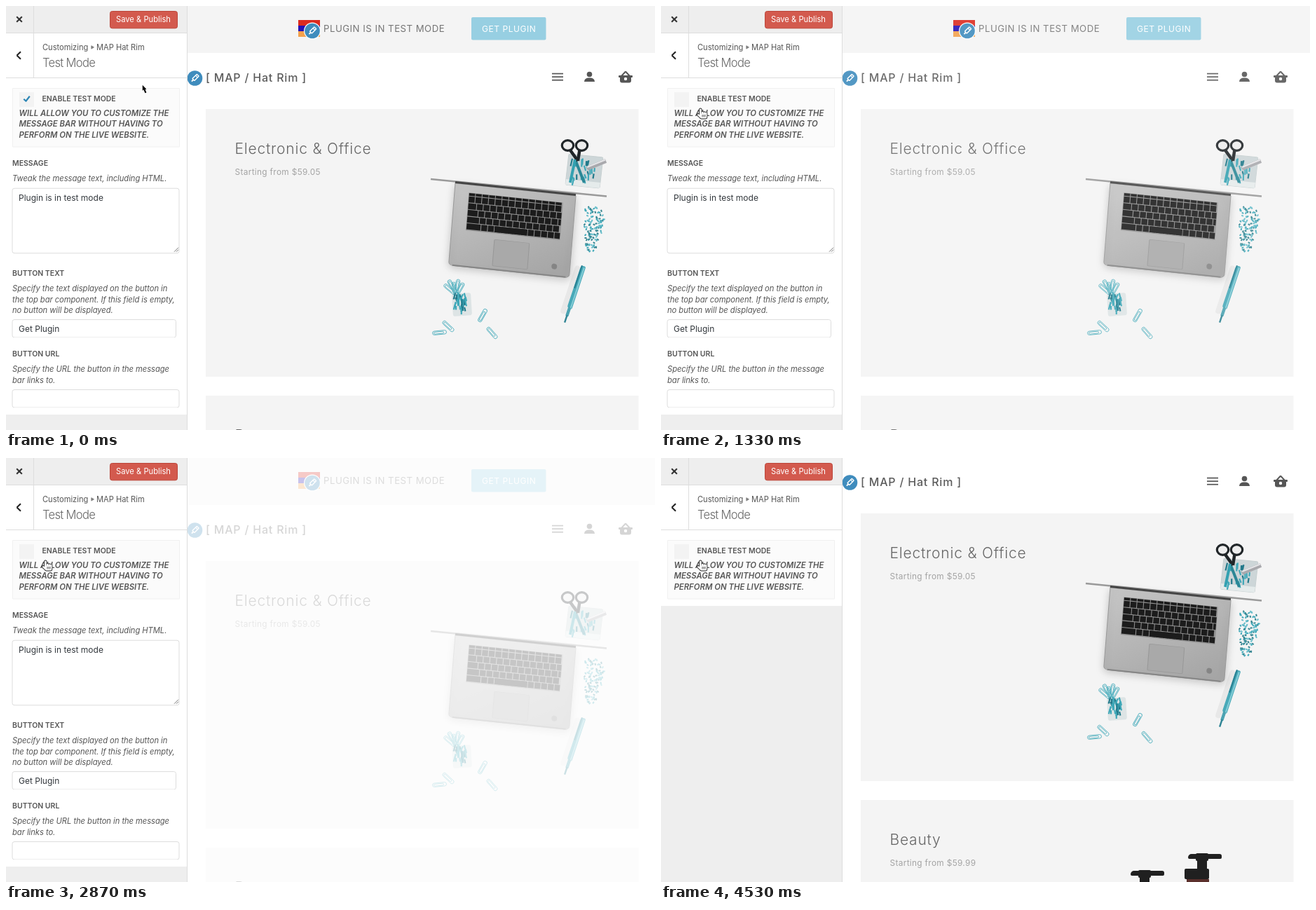
An HTML page with a canvas that plays this animation: 926 px wide and 605 px high, repeating every 4.59 s.

```html
<!DOCTYPE html>
<html lang="en">
<head>
<meta charset="utf-8">
<title>Test mode toggle</title>
<style>
html, body { margin: 0; width: 100%; height: 100%; overflow: hidden; background: #fff; }
canvas { display: block; }
</style>
</head>
<body>
<canvas id="stage" width="926" height="605"></canvas>
<script>
const ctx = document.getElementById('stage').getContext('2d');
const LOOP = 4590;
const SWAP = 3150;
const SIDEBAR = 258;
const BAR_HEIGHT = 68;

const phase = (t, from, to) => Math.max(0, Math.min(1, (t - from) / (to - from)));
const swing = p => 0.5 - Math.cos(p * Math.PI) / 2;
const mix = (a, b, p) => a + (b - a) * p;
const times = (n, draw) => { for (let i = 0; i < n; i++) draw(i); };

function randomizer(seed) {
  const next = () => (seed = (seed * 16807) % 2147483647) / 2147483647;
  return (from, to) => mix(from, to, next());
}

/* Drawing helpers */

const style = (font, color, spacing = 0) =>
  ({ font: font + ' Inter, sans-serif', color, spacing: spacing + 'px' });

const styles = {
  label: style('600 10.5px', '#555'),
  strong: style('italic 600 11.35px', '#555'),
  hint: style('italic 400 11.2px', '#555', -0.04),
  field: style('400 12px', '#32373c'),
  crumb: style('400 11.1px', '#555'),
  title: style('300 16.6px', '#666', -0.7),
  save: style('400 11.2px', '#fff'),
  bar: style('400 13.2px', '#757575', 0.5),
  cta: style('400 12px', '#fff', 0.55),
  site: style('500 16px', '#5c5c5c', 0.8),
  heading: style('300 21px', '#666', 0.8),
  price: style('400 11.8px', '#a3a3a3', 0.35)
};

function text(str, x, y, { font, color, spacing }) {
  ctx.font = font;
  ctx.letterSpacing = spacing;
  ctx.fillStyle = color;
  ctx.fillText(str, x, y);
}

function paint(fill, stroke, width = 1) {
  if (fill) { ctx.fillStyle = fill; ctx.fill(); }
  if (stroke) { ctx.strokeStyle = stroke; ctx.lineWidth = width; ctx.stroke(); }
}

function rect(x, y, w, h, color) {
  ctx.fillStyle = color;
  ctx.fillRect(x, y, w, h);
}

function box(x, y, w, h, r, ...colors) {
  ctx.beginPath();
  ctx.roundRect(x, y, w, h, r);
  paint(...colors);
}

function oval(x, y, rx, ry, ...colors) {
  ctx.beginPath();
  ctx.ellipse(x, y, rx, ry, 0, 0, 7);
  paint(...colors);
}

function line(x1, y1, x2, y2, color, width = 1) {
  ctx.beginPath();
  ctx.moveTo(x1, y1);
  ctx.lineTo(x2, y2);
  paint(null, color, width);
}

function scoped(draw) {
  ctx.save();
  draw();
  ctx.restore();
}

function placed(x, y, angle, draw) {
  scoped(() => {
    ctx.translate(x, y);
    ctx.rotate(angle);
    draw();
  });
}

// Maps a 100 by 100 square onto the parallelogram spanned by two edges.
function skewed(x, y, [ux, uy], [vx, vy], draw) {
  scoped(() => {
    ctx.transform(ux / 100, uy / 100, vx / 100, vy / 100, x, y);
    draw();
  });
}

function clipped(x, y, w, h, draw) {
  scoped(() => {
    ctx.beginPath();
    ctx.rect(x, y, w, Math.max(0, h));
    ctx.clip();
    draw();
  });
}

/* Preview pane */

function badge(x, y) {
  oval(x, y, 12, 12, '#fff');
  oval(x, y, 10.8, 10.8, '#3f8cbd');
  placed(x, y, Math.PI / 4, () => {
    box(-2, -6, 4, 9, 0.5, null, '#fff', 1.4);
    line(-2, -3.4, 2, -3.4, '#fff', 1.2);
    line(0, 3, 0, 6.5, '#fff', 2);
  });
}

function laptop() {
  skewed(641, 253, [172, 18], [-9.5, 117], () => {
    scoped(() => {
      ctx.shadowColor = 'rgba(0,0,0,.2)';
      ctx.shadowBlur = 12;
      ctx.shadowOffsetY = 3;
      const metal = ctx.createLinearGradient(0, 0, 80, 100);
      metal.addColorStop(0, '#c6c6c6');
      metal.addColorStop(1, '#a6a6a6');
      box(0, 0, 100, 100, [0, 0, 4, 4], metal, '#999', 0.6);
    });
    line(3, 99.3, 97, 99.3, '#858585', 1.6);
    keyboard(12.2, 10, 77.3, 45);
    box(36, 63, 29, 32, 1, '#a9a9a9', '#989898', 0.6);
    oval(87, 88, 2.3, 3.4, '#858585');
  });
  line(606, 247, 857, 271.5, '#9a9a9a', 2.6);
  line(641, 251.5, 813, 269.5, '#454545', 3.2);
}

function keyboard(x, y, w, h) {
  const pitch = w / 14;
  const rowHeight = h / 5.5;
  rect(x - 0.4, y - 0.4, w + 0.8, h + 0.8, '#929292');
  times(6, row => {
    const top = row ? y + (row - 0.5) * rowHeight : y;
    const height = rowHeight * (row ? 1 : 0.5) - 0.9;
    const shift = row > 1 ? (row - 1) * pitch * 0.3 : 0;
    rect(x, top, pitch + shift - 0.6, height, '#1c1c1c');
    for (let k = x + pitch + shift; k < x + w - 1; k += pitch) {
      rect(k, top, Math.min(pitch - 0.6, x + w - k), height, '#1c1c1c');
    }
    if (row === 5) rect(x + w * 0.3, top, w * 0.35, height, '#1c1c1c');
  });
}

function shards(seed, count, x, y, w, h) {
  const random = randomizer(seed);
  times(count, i => {
    const sx = x + random(0, w);
    const sy = y + random(0, h);
    line(sx, sy, sx + random(-3, 3), sy + random(5, 11), i % 3 ? '#3fa8b8' : '#237a8b', 2.2);
  });
}

function scissorsCup() {
  skewed(803, 211, [49, 5], [-5, 44], () => {
    box(0, 0, 100, 100, 4, 'rgba(190,203,206,.7)', '#c6cfd0', 2);
    rect(0, 82, 100, 18, 'rgba(235,240,240,.8)');
  });
  shards(61, 20, 808, 217, 34, 30);
  line(829, 232, 856, 221, '#a9a9ad', 6);
  line(829, 230, 855, 219.5, '#e5e5e8', 2);
  for (const [x, side] of [[801.5, 1], [821.5, -1]]) {
    line(812, 219, 815 + side * 10, 252, side > 0 ? '#2b8796' : '#34a1b1', 4);
    line(x + side * 3, 205, 816, 221, '#202528', 4.5);
    oval(x, 199, 8.2, 7.3, '#ededed', '#202528', 3.2);
  }
}

function pins() {
  const random = randomizer(907);
  times(115, i => {
    const p = random(0, 1) ** 1.2;
    const spread = mix(15, 6, p * p);
    const x = mix(840, 835, p) + random(-spread, spread);
    const y = mix(288, 349, p);
    const angle = random(0, 6);
    line(x, y, x + Math.cos(angle) * 3, y + Math.sin(angle) * 3,
      `hsl(188 48% ${38 + i % 3 * 11}%)`, 2);
  });
}

function pen() {
  placed(824, 371, Math.atan2(81, -27), () => {
    box(2, 3, 72, 8, 4, 'rgba(0,0,0,.05)');
    box(0, -3.6, 64, 7.2, [2, 2, 4, 4], '#48a9b8');
    rect(2, -2.6, 62, 2, '#86cdd7');
    rect(0, 1.2, 34, 2, '#277f91');
    box(62, -2.2, 14, 4.4, 2, '#4ca3b2');
    line(74, 0, 85, 0, '#2f8494', 2.4);
  });
}

function clip(x, y, angle) {
  placed(x, y, angle, () => {
    box(-10, -2.7, 20, 5.4, 2.7, null, '#59b3c1', 0.9);
    box(-8, -1.3, 14, 2.8, 1.4, null, '#59b3c1', 0.9);
  });
}

function clipCup() {
  skewed(636, 411, [27, -2], [2, 32], () => box(0, 0, 100, 100, 10, 'rgba(215,224,225,.8)'));
  times(5, i => clip(633 + i * 3.6, 404 - i % 2 * 4, 0.7 + i * 0.35));
  shards(33, 32, 641, 408, 15, 23);
}

function pump(x, y) {
  const dark = '#202020';
  box(x, y, 48, 7, [5, 3, 2, 2], dark);
  box(x + 11, y - 1, 18, 11, 2, dark);
  rect(x + 13, y + 8, 14, 15, dark);
}

function icons() {
  const gray = '#565656';
  times(3, i => rect(779, 95.7 + i * 4.6, 16, 1.7, gray));
  oval(832.5, 97.5, 3.8, 3.8, gray);
  box(825, 102.5, 15, 5.6, [7, 7, 0, 0], gray);
  for (const side of [-1, 1]) line(884, 93.5, 884 + side * 6, 100, gray, 1.9);
  box(874, 99, 20, 3, 1, gray);
  box(876, 100, 16, 9.5, [0, 0, 3, 3], gray);
  oval(884, 104, 2.2, 2.2, '#fff');
}

function card(y, heading, price) {
  rect(285, y, 617.5, 382, '#f4f4f4');
  text(heading, 326.5, y + 63.5, styles.heading);
  text(price, 326.5, y + 94, styles.price);
}

function preview() {
  rect(SIDEBAR + 1, 0, 667, 67, '#f4f4f4');
  ['#db2b1f', '#2411b5', '#f3a14d'].forEach((c, i) => rect(417, 20 + i * 8, 31, 8, c));
  badge(437, 35.5);
  text('PLUGIN IS IN TEST MODE', 453, 36.7, styles.bar);
  box(664, 16, 106.5, 32.5, 2, '#97cfe2');
  text('GET PLUGIN', 679, 36.7, styles.cta);

  badge(269.5, 103);
  text('[ MAP / Hat Rim ]', 285, 108, styles.site);
  icons();

  card(147, 'Electronic & Office', 'Starting from $59.05');
  laptop();
  scissorsCup();
  pins();
  pen();
  clipCup();
  clip(618.5, 466, -0.1);
  clip(631, 457, 0.75);
  clip(680, 441.5, -1.05);
  clip(693.5, 466.5, 0.85);

  card(556, 'Beauty', 'Starting from $59.99');
  pump(670, 657);
  pump(752, 633);
  box(747, 654, 35, 15, 2, '#202020');
  rect(750, 669, 32, 20, '#5b302c');
}

/* Settings panel */

const controls = [
  {
    label: 'MESSAGE', value: 'Plugin is in test mode', width: 238, height: 92.5, gap: 32.5,
    hints: ['Tweak the message text, including HTML.']
  },
  {
    label: 'BUTTON TEXT', value: 'Get Plugin', width: 233.5, height: 25.5, gap: 27.5,
    hints: ['Specify the text displayed on the button in',
      'the top bar component. If this field is empty,', 'no button will be displayed.']
  },
  {
    label: 'BUTTON URL', value: '', width: 238, height: 25.5, gap: 27.5,
    hints: ['Specify the URL the button in the message', 'bar links to.']
  }
];
const fieldTop = c => 16.4 + 15.3 * c.hints.length;
const controlHeight = c => fieldTop(c) + c.height + c.gap;
const totalHeight = controls.reduce((sum, c) => sum + controlHeight(c), 0);

function control(c, base, height) {
  clipped(0, base - 13, SIDEBAR, height - 14, () => {
    const top = base + fieldTop(c);
    text(c.label, 9, base, styles.label);
    c.hints.forEach((hint, i) => text(hint, 9, base + 22.4 + i * 15.6, styles.hint));
    box(9, top + 0.5, c.width, c.height, 3, '#fff', '#ddd');
    text(c.value, 18, top + 17.8, styles.field);
    if (c.height > 30) {
      for (const s of [3, 6]) line(246 - s, top + 91, 246, top + 91 - s, '#777');
    }
  });
}

function panel(checked, open) {
  rect(0, 0, SIDEBAR, 605, '#eee');
  rect(0, 38, SIDEBAR, 1, '#ddd');
  rect(0, 39, SIDEBAR, 172 + totalHeight * open, '#fff');
  rect(0, 102, SIDEBAR, 1, '#ddd');
  rect(39, 0, 1, 102, '#ddd');
  rect(SIDEBAR, 0, 1, 605, '#ddd');
  for (const side of [-1, 1]) {
    line(19 - 3.8, 19 - side * 3.8, 19 + 3.8, 19 + side * 3.8, '#333', 2.1);
    line(15.5, 70.5, 21, 70.5 + side * 5.2, '#222', 2.1);
  }
  box(148.5, 7.5, 96, 24.3, 3, '#d35a4e', '#bc463a');
  text('Save & Publish', 157, 23.4, styles.save);
  text('Customizing', 52, 62.7, styles.crumb);
  times(4, i => rect(121.5 + i, 56.5 + i * 0.6, 1, 4.8 - i * 1.2, '#555'));
  text('MAP Hat Rim', 129, 62.7, styles.crumb);
  text('Test Mode', 52, 87, styles.title);

  box(9.5, 117.5, 238, 83.5, 0, '#fbfbfb', '#f0f0f0');
  rect(19, 123, 21, 21, '#f3f3f3');
  if (checked) {
    line(25.3, 132.8, 28.8, 136, '#2c86b5', 2.2);
    line(28, 136.2, 33.8, 128.8, '#2c86b5', 2.2);
  }
  text('ENABLE TEST MODE', 51.5, 136.4, styles.label);
  ['WILL ALLOW YOU TO CUSTOMIZE THE', 'MESSAGE BAR WITHOUT HAVING TO', 'PERFORM ON THE LIVE WEBSITE.']
    .forEach((row, i) => text(row, 18.5, 156.6 + i * 15.6, styles.strong));

  let base = 228;
  for (const c of controls) {
    const height = controlHeight(c) * open;
    if (open) control(c, base, height);
    base += height;
  }
}

/* Pointer */

function handShape(color, grow) {
  const part = (x, y, w, h) =>
    box(x - grow, y - grow, w + grow * 2, h + grow * 2, 1.4 + grow, color);
  part(-1, 0, 2.6, 10);
  times(3, i => part(2 + i * 2.5, 4.3 + i * 0.4, 2.4, 6));
  part(0, 7, 9.3, 7);
  placed(-3, 7, 0.75, () => part(0, 0, 7, 2.4));
}

function hand() {
  handShape('#222', 0.9);
  handShape('#fff', 0);
  times(3, i => line(3 + i * 2, 8.5, 3 + i * 2, 12, '#333', 0.8));
}

function arrow() {
  ctx.beginPath();
  ctx.moveTo(0, 0);
  ctx.lineTo(0, 11.5);
  ctx.lineTo(2.8, 9);
  ctx.lineTo(8, 8.2);
  ctx.closePath();
  paint('#000', '#fff', 1.5);
  line(3, 7, 5.4, 12.8, '#000', 2.1);
  paint('#000');
}

function render(t) {
  const swapped = t >= SWAP;
  rect(0, 0, 926, 605, '#fff');
  clipped(SIDEBAR + 1, 0, 667, 605, () => {
    placed(0, swapped ? -BAR_HEIGHT : 0, 0, preview);
    const veil = swapped ? 0 : 0.75 * phase(t, 1300, 1520);
    rect(SIDEBAR + 1, 0, 667, 605, `rgba(255,255,255,${veil})`);
  });
  panel(t < 830, 1 - swing(phase(t, SWAP + 4, SWAP + 204)));

  const reach = swing(phase(t, 50, 520));
  const leave = swing(phase(t, 960, 1190));
  const x = mix(mix(194, 34, reach), 56, leave);
  const y = mix(mix(111, 132.5, reach), 146.5, leave);
  const overBox = y > 117 && (t < SWAP || t > 3930);
  placed(x, y, 0, overBox ? hand : arrow);
}

function tick() {
  render(performance.now() % LOOP);
  requestAnimationFrame(tick);
}
tick();
</script>
</body>
</html>
```
